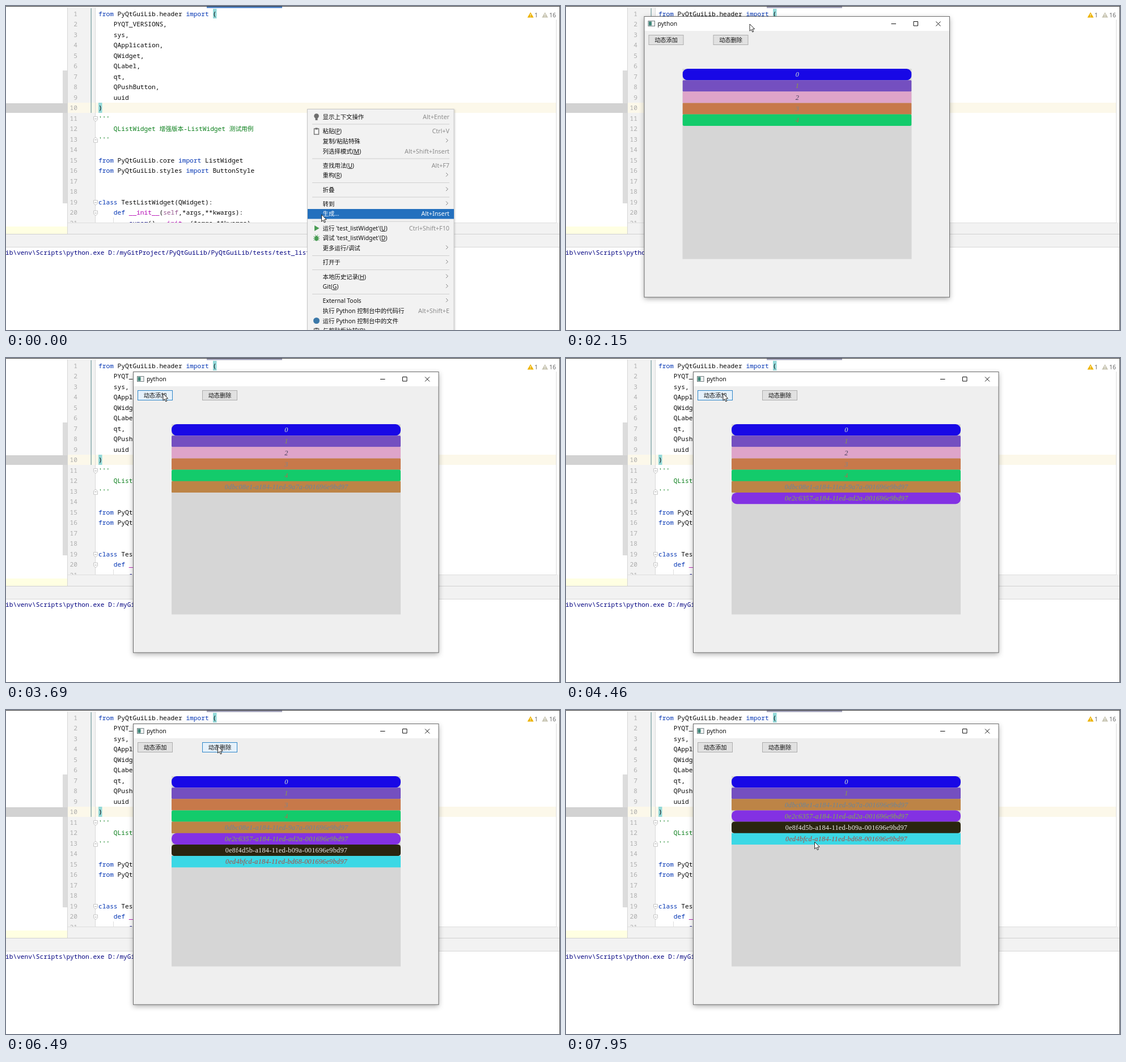
An HTML page that plays this animation: 977 px wide and 573 px high, repeating every 7990 ms.

```html
<!DOCTYPE html>
<html lang="zh">
<head>
<meta charset="utf-8">
<title>ListWidget</title>
<style>
html, body { margin: 0; width: 100%; height: 100%; overflow: hidden; background: #fff; }
svg { display: block; width: 100%; height: 100%; }
text { white-space: pre; }
.mono { font: 11.2px "Noto Sans Mono", "Noto Sans CJK SC", monospace; fill: #080808; }
.ui { font: 10.4px "Noto Sans", "Noto Sans CJK SC", sans-serif; fill: #111; }
.num { fill: #adadad; text-anchor: end; }
.k { fill: #0033b3; }
.g { fill: #067d17; }
.m { fill: #b200b2; }
.s { fill: #94558d; }
.b { fill: #000080; }
.z { font-size: 10.7px; }
.u { text-decoration: underline; }
.key { font-size: 10.8px; fill: #8c8c8c; text-anchor: end; }
.mid { text-anchor: middle; }
.on text { fill: #fff; }
.on .chev { stroke: #fff; }
.chev { fill: none; stroke: #7f7f7f; }
.item { font: italic 12.2px "Liberation Serif", serif; letter-spacing: .28px; text-anchor: middle; }
</style>
</head>
<body>
<svg viewBox="0 0 977 573" preserveAspectRatio="none">
  <defs>
    <filter id="shade" x="-10%" y="-10%" width="120%" height="120%">
      <feDropShadow dx="0" dy="3" stdDeviation="5" flood-color="#000" flood-opacity=".32"/>
    </filter>
    <filter id="soft" x="-10%" y="-10%" width="120%" height="120%">
      <feDropShadow dx="1" dy="1" stdDeviation="1.5" flood-color="#000" flood-opacity=".2"/>
    </filter>
    <clipPath id="page"><rect x="109" y="0" width="868" height="383"/></clipPath>
    <clipPath id="box"><rect x="292" y="117" width="404" height="336.5"/></clipPath>
  </defs>
  <g id="editor"></g>
  <g id="menu"></g>
  <g id="win"></g>
  <path id="cursor" d="M.5 0V12.2L3.4 9.6 5.3 14 7.3 13.1 5.4 8.9 9.2 8.6Z" fill="#fff" stroke="#111" stroke-width=".9"/>
</svg>
<script>
const LOOP = 7990, SLIDE = 300;
const $ = id => document.getElementById(id);
const rect = (x, y, w, h, fill, more = '') =>
  `<rect x="${x}" y="${y}" width="${w}" height="${h}" fill="${fill}" ${more}/>`;
const text = (x, y, cls, s, more = '') => `<text x="${x}" y="${y}" class="${cls}" ${more}>${s}</text>`;
const path = (d, stroke, fill = 'none', more = '') =>
  `<path d="${d}" stroke="${stroke}" fill="${fill}" ${more}/>`;
// {k|word} marks a coloured span
const mark = s => s.replace(/\{(\w)\|(.*?)\}/g, '<tspan class="$1">$2</tspan>');

/* ---------- editor ---------- */
const code = [
  '{k|from} PyQtGuiLib.header {k|import} (',
  '    PYQT_VERSIONS,', '    sys,', '    QApplication,', '    QWidget,', '    QLabel,', '    qt,',
  '    QPushButton,', '    uuid', ')',
  "{g|'''}",
  '{g|    QListWidget }{z|<tspan class="g">增强版本</tspan>}{g|-ListWidget }{z|<tspan class="g">测试用例</tspan>}',
  "{g|'''}", '',
  '{k|from} PyQtGuiLib.core {k|import} ListWidget',
  '{k|from} PyQtGuiLib.styles {k|import} ButtonStyle', '', '',
  '{k|class} TestListWidget(QWidget):',
  '    {k|def} {m|__init__}({s|self},*args,**kwargs):',
  '        {b|super}().{m|__init__}(*args,**kwargs)'
];
const lineY = n => 17.7 + 18.5 * (n - 1);
const fold = (n, up) => {
  const y = lineY(n) - 3;
  return path(up ? `M154.500 ${y + 4.5}v-6l3.500-3 3.500 3v6Z` : `M154.500 ${y - 4}h7v5.500l-3.500 3-3.500-3Z`, '#c4c4c4', '#fff') +
    path(`M156 ${y}h4`, '#b0b0b0');
};
const warn = (x, fill) =>
  path(`M${x} 20.500L${x + 5.5} 11 ${x + 11} 20.500Z`, 'none', fill) +
  path(`M${x + 5.5} 14v3.200m0 1v1.200`, '#fff');

$('editor').innerHTML =
  rect(0, 0, 977, 573, '#fff') +
  rect(109, 3, 48, 380, '#f2f2f2') +
  rect(109, 171, 861, 18, '#fcf8ea') +
  rect(157, 3, 1, 380, '#dadada') + rect(970, 24, 1, 359, '#dcdcdc') +
  rect(108, 3, 1, 400, '#d6d6d6') +
  rect(149.5, 4, 1.3, 185, '#78a0a2') +
  rect(100, 114, 8, 235, '#dcdcdc') +
  rect(0, 172, 108, 17, '#d2d2d2') +
  rect(0, 390, 108, 13, '#ffffe2') +
  rect(365, 5, 6.5, 17, '#93d9d9') + rect(163, 171, 6.5, 18, '#93d9d9') +
  '<g clip-path="url(#page)">' +
  code.map((s, i) => text(126, lineY(i + 1), 'mono num', i + 1) +
    text(163, lineY(i + 1), 'mono', mark(s))).join('') +
  rect(189, 374, 1, 9, '#ddd') + '</g>' +
  fold(11) + fold(13, true) + fold(19) + fold(20) +
  rect(109, 383, 868, 20, '#f2f2f2') + rect(109, 383, 862, 1, '#dedede') +
  rect(0, 403, 977, 23, '#f2f2f2') + rect(0, 403, 977, 1, '#d0d0d0') + rect(0, 426, 977, 1, '#d8d8d8') +
  text(-1, 440, 'mono b', 'ib\\venv\\Scripts\\python.exe D:/myGitProject/PyQtGuiLib/PyQtGuiLib/tests/test_listWidget.py') +
  warn(919.5, '#edb200') + text(932, 19.5, 'ui', '1', 'style="fill:#666"') +
  warn(945, '#c9c6b4') + text(958, 19.5, 'ui', '16', 'style="fill:#666"') +
  rect(0, 0, 977, 1, '#3c3c3c') + rect(0, 1, 977, 2, '#f0f0f0') +
  rect(354, 1, 133, 2.6, '#4a7fc4', 'id="tab"') +
  rect(976, 0, 1, 573, '#555');

/* ---------- context menu ---------- */
// centre y, label, shortcut ('>' opens a submenu)
const entries = [
  [196, '显示上下文操作', 'Alt+Enter'],
  [221.5, '粘贴({u|P})', 'Ctrl+V'], [239, '复制/粘贴特殊', '>'], [257, '列选择模式({u|M})', 'Alt+Shift+Insert'],
  [282, '查找用法({u|U})', 'Alt+F7'], [299.5, '重构({u|R})', '>'],
  [325, '折叠', '>'],
  [350, '转到', '>'], [367.5, '生成...', 'Alt+Insert'],
  [393, "运行 'test_listWidget'({u|U})", 'Ctrl+Shift+F10'], [410.5, "调试 'test_listWidget'({u|D})", ''], [428, '更多运行/调试', '>'],
  [453.500, '打开于', '>'],
  [479, '本地历史记录({u|H})', '>'], [496.5, 'Git({u|G})', '>'],
  [521.5, 'External Tools', '>'], [539, '执行 Python 控制台中的代码行', 'Alt+Shift+E'],
  [557, '运行 Python 控制台中的文件', ''], [574.5, '与剪贴板比较({u|B})', '']
];
const clip = y => rect(543.5, y - 4.5, 8, 10, '#fff', 'stroke="#6e6e6e" stroke-width="1.4"') + rect(545.5, y - 6, 4, 3, '#6e6e6e');
const bug = y => `<ellipse cx="547.500" cy="${y + .5}" rx="3.200" ry="4.500" fill="#499c54"/>` +
  path(`M542.500 ${y - 3}l10 7m0-7l-10 7m-.5-3.500h11M545 ${y - 6}l1.500 2m3.500-2l-1.500 2`, '#499c54');
$('menu').innerHTML =
  rect(531.5, 182.5, 258.5, 400, '#f2f2f2', 'stroke="#c6c6c6" filter="url(#soft)"') +
  rect(532, 359, 258, 17.5, '#2370be', 'id="bar"') +
  [208.5, 269.5, 312, 337.5, 380.5, 441, 466, 509].map(y => rect(540, y, 242, 1, '#d0d0d0')).join('') +
  entries.map(([y, label, key]) => '<g class="entry">' + text(558.5, y + 3.8, 'ui', mark(label)) +
    (key === '>' ? path(`M776 ${y - 4.5}l3.300 3.300-3.300 3.300`, '', 'none', 'class="chev"')
      : text(782, y + 3.8, 'ui key', key)) + '</g>').join('') +
  '<circle cx="547.500" cy="194.500" r="4.300" fill="#6e6e6e"/>' + rect(545.5, 198, 4, 4, '#6e6e6e') +
  clip(221.5) + clip(575) + bug(410.5) +
  path('M544 388l8.500 5-8.500 5Z', 'none', '#499c54') +
  '<circle cx="547.500" cy="556.500" r="5.500" fill="#3b78a8"/>';
const menuRows = [...document.querySelectorAll('.entry')];

/* ---------- window ---------- */
const ADD = [3383, 4119, 4768, 5223], CUT = [6170, 6840, 7330], OPEN = 1078;
// fill, text colour, corner radius, label
const items = [
  ['#1808e6', '#d5ead0', 9, '0'],
  ['#744fc0', '#8e9c42', 2, '1'],
  ['#dea4c9', '#46405c', 2, '2'],
  ['#c7794a', '#7c8590', 1, '3'],
  ['#13cb6b', '#a87052', 3, '4'],
  ['#bd8446', '#6585a0', 1, '0dbc08e1-a184-11ed-9a7a-001696e9bd97'],
  ['#8331e3', '#83b83e', 9, '0e2c6357-a184-11ed-ad2a-001696e9bd97'],
  ['#2a250f', '#f0f0f0', 5, '0e8f4d5b-a184-11ed-b09a-001696e9bd97'],
  ['#3bd8e5', '#b0453f', 0, '0ed4bfcd-a184-11ed-bd68-001696e9bd97']
].map(([fill, ink, r, label], i) => ({
  fill, ink, r, label, slot: i,
  born: i < 5 ? OPEN : ADD[i - 5],
  dies: i > 1 && i < 5 ? CUT[i - 2] : Infinity
}));
const button = (id, x, label) =>
  rect(x + .5, 57.5, 61, 17, '#e1e1e1', `id="${id}" stroke="#adadad"`) + text(x + 31, 70, 'ui mid', label, 'style="font-size:10.2px"');
$('win').innerHTML =
  rect(224.5, 24.5, 538.5, 496.5, '#efefef', 'filter="url(#shade)"') +
  rect(224.5, 24.5, 538.5, 25.5, '#fff') +
  rect(224.5, 24.5, 538.5, 496.5, 'none', 'stroke="#6c6c6c"') +
  rect(231.5, 32.5, 11.5, 9, '#f4f4f4', 'stroke="#6f7d80"') + rect(232.5, 33.5, 5, 7, '#3c8577') +
  text(248, 41.3, 'ui', 'python', 'style="font-size:10.5px"') +
  path('M660 37.500h8.500M699.500 33.500h7.500v7.500h-7.500ZM739 33.500l8 8m0-8l-8 8', '#111') +
  button('plus', 232, '动态添加') + button('minus', 346, '动态删除') +
  rect(292, 117, 404, 336.5, '#d6d6d6') +
  '<g clip-path="url(#box)">' + items.map(o => '<g class="bar">' +
    rect(292, 0, 404, 20.3, o.fill, `rx="${o.r}"`) +
    text(494.5, 14.3, 'item', o.label, `style="fill:${o.ink}${o.slot === 7 ? ';font-style:normal' : ''}"`) +
    '</g>').join('') + '</g>';
const bars = [...document.querySelectorAll('.bar')];

/* ---------- motion ---------- */
const clamp = v => Math.min(1, Math.max(0, v));
const ease = u => u * u * (3 - 2 * u);
const set = (el, o) => { for (const k in o) el.setAttribute(k, o[k]); };
const show = (el, on) => el.style.display = on ? '' : 'none';
const GRAB = 2150, DROP = 2780;
const track = [
  [40, 556, 369], [280, 561, 394], [570, 561, 394], [800, 560, 380], [1400, 560, 380],
  [1900, 323.5, 32], [GRAB, 323.5, 32], [DROP, 410, 38], [2920, 368, 81], [3220, 276.5, 63],
  [5640, 276.5, 63], [5980, 373, 64], [7620, 373, 64], [7940, 438, 233.5]
];
function pointer(t) {
  const i = track.findIndex(p => p[0] > t);
  if (i < 1) return (i ? track[track.length - 1] : track[0]).slice(1);
  const [t0, x0, y0] = track[i - 1], [t1, x1, y1] = track[i], u = ease((t - t0) / (t1 - t0));
  return [x0 + (x1 - x0) * u, y0 + (y1 - y0) * u];
}
function paintButton(el, left, [x, y], t, clicks) {
  const over = t > DROP && x >= left && x < left + 62 && y >= 57 && y < 75;
  const down = over && clicks.some(c => t > c - 80 && t < c + 100);
  set(el, { fill: down ? '#d3e8f8' : over ? '#e5f1fb' : '#e1e1e1', stroke: down ? '#1a6aa8' : over ? '#2f86c8' : '#adadad' });
}
function draw(t) {
  const pos = pointer(t);
  set($('cursor'), { transform: `translate(${pos})` });

  show($('menu'), t < 600);
  const low = pos[1] > 383;
  set($('bar'), { y: low ? 384.5 : 359 });
  menuRows.forEach((g, i) => g.classList.toggle('on', i === (low ? 9 : 8)));
  set($('tab'), { fill: t < 1140 ? '#4a7fc4' : '#9c9cb4' });

  const u = clamp((t - 1140) / 280), s = 1 - .16 * (1 - u) ** 2;
  const left = 1 - ease(clamp((t - GRAB) / (DROP - GRAB)));
  show($('win'), u > 0);
  set($('win'), {
    opacity: u,
    transform: `translate(${493.5 - 86.5 * left} ${272.5 - 6 * left}) scale(${s}) translate(-493.5 -272.5)`
  });
  paintButton($('plus'), 232, pos, t, ADD);
  paintButton($('minus'), 346, pos, t, CUT);

  items.forEach((o, i) => {
    const g = bars[i], p = clamp((t - o.born) / SLIDE);
    const gone = i > 4 ? CUT : CUT.slice(0, Math.max(0, i - 2));
    const slot = o.slot - gone.reduce((n, c) => n + clamp((t - c) / SLIDE), 0);
    const y = 117 + 20.15 * slot;
    show(g, t >= o.born && t < o.dies);
    show(g.lastChild, p === 1);
    set(g.firstChild, { width: p < 1 ? 401 : 404 });
    set(g, { transform: `translate(0 ${453 + (y - 453) * p})` });
  });
}
const start = performance.now();
function tick() {
  draw((performance.now() - start) % LOOP);
  requestAnimationFrame(tick);
}
tick();
</script>
</body>
</html>
```
